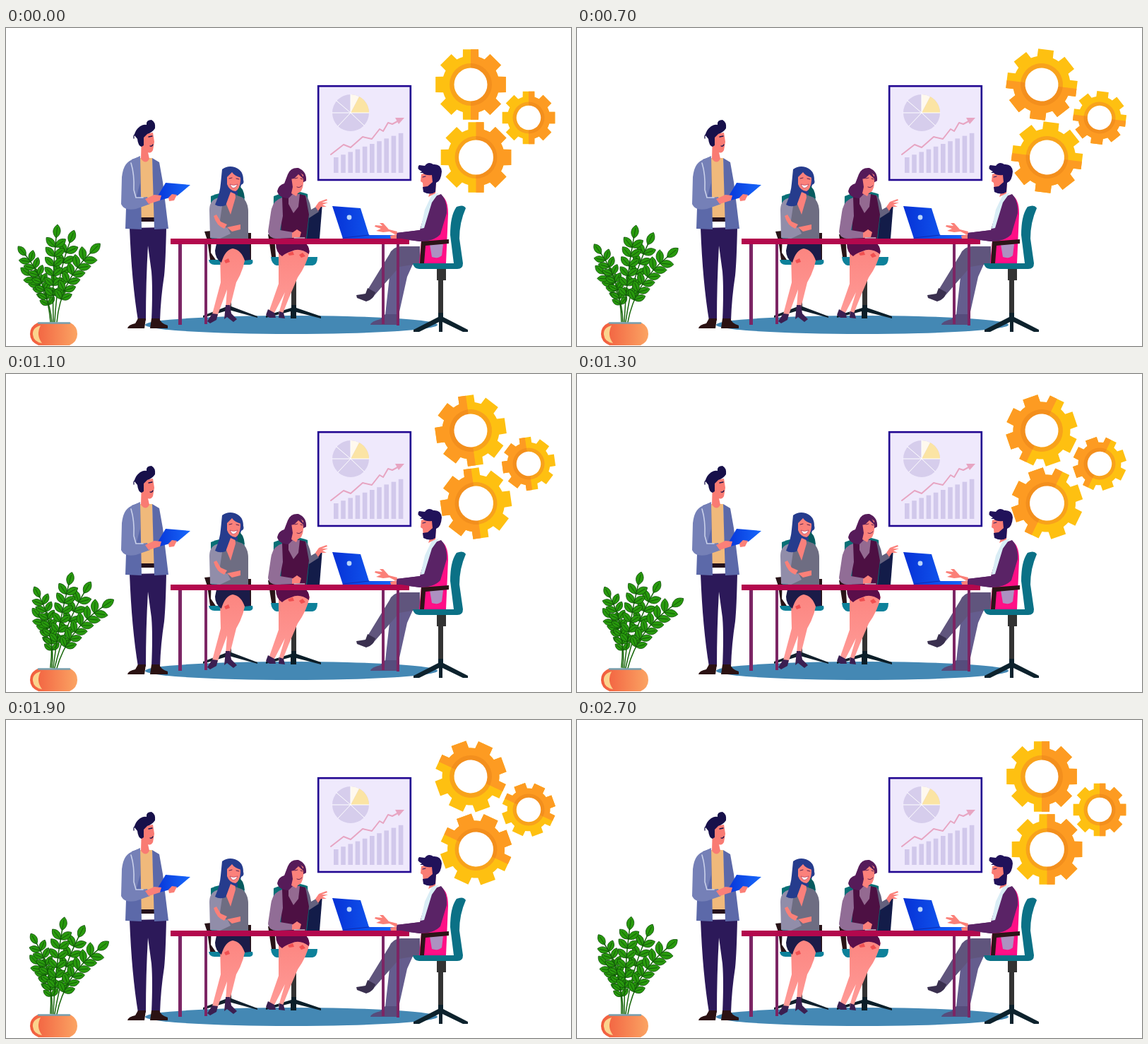
An HTML page for the animation above (2.8 s loop, 800 by 450 pixels).

```html
<!DOCTYPE html>
<html lang="en">
<head>
<meta charset="utf-8">
<title>Team meeting</title>
<style>
  html, body { margin: 0; width: 100%; height: 100%; overflow: hidden; background: #fff; }
  svg { display: block; width: 800px; height: 450px; }
  .line { fill: none; stroke-linecap: round; stroke-linejoin: round; }
</style>
</head>
<body>
<svg viewBox="0 0 800 450">
  <defs>
    <clipPath id="rightHalf"><path d="M0-60H60V60H0Z"/></clipPath>
    <linearGradient id="blue"><stop stop-color="#0632d6"/><stop offset="1" stop-color="#1768fb"/></linearGradient>
    <linearGradient id="potFill"><stop stop-color="#f15a3d"/><stop offset="1" stop-color="#fba463"/></linearGradient>
    <linearGradient id="shin" x2="0" y2="1"><stop stop-color="#fc8580"/><stop offset="1" stop-color="#ff9c98"/></linearGradient>
  </defs>

  <ellipse cx="404" cy="420" rx="207" ry="13" fill="#4488b4"/>

  <g id="board">
    <rect x="442.2" y="82.2" width="130.6" height="132.8" fill="#efe9fc" stroke="#210591" stroke-width="2.6"/>
    <circle cx="488" cy="120" r="26" fill="#d6cdec"/>
    <path d="M488 120L500 97A26 26 0 0 1 514 120Z" fill="#fbe4a4"/>
    <path d="M488 120V94A26 26 0 0 1 500 97Z" fill="#fff9ee"/>
    <path class="line" stroke="#fff" d="M462 120H514M488 120L468 103M488 120L470 139M488 120V94M488 120L507 138"/>
    <g id="bars" fill="#d1c8eb"></g>
    <path class="line" stroke="#e7a5c2" stroke-width="2" d="M460 179L478 165L488 169L505 154L518 157L529 143L534 146L541 134L547 136L558 130"/>
    <path fill="#e7a5c2" d="M551 127L564 127L556 136Z"/>
  </g>

  <g id="gears"></g>

  <g id="plant"></g>
  <g id="pot">
    <path fill="url(#potFill)" d="M45 417H91Q101 422 101 433Q101 444 90 449H46Q34 444 34 433Q34 422 45 417Z"/>
    <path fill="#fbd38d" d="M49 421Q37 424 38 434Q39 444 51 446Q42 434 49 421Z"/>
    <path class="line" stroke="#779fae" stroke-width="2.4" d="M46 417.5H90"/>
  </g>

  <g id="standingMan">
    <path fill="#2c1959" d="M175 283L227 282Q226 330 224 350Q219 382 218 414H206Q208 370 206 345L201 308Q198 360 198 414H187Q178 360 175 283Z"/>
    <path fill="#2b1213" d="M187 411H198L196 425H172Q173 420 183 418ZM206 411H217Q219 418 229 421V425H204Z"/>
    <path fill="#f0b97b" d="M190 184H207L211 271H190Z"/>
    <path fill="#24121c" d="M190 268H210V274H190Z"/>
    <path fill="#f97b73" d="M192 151L208 148L210 161L208 173Q205 178 201 176L203 185Q198 194 191 185Z"/>
    <path fill="#17104a" d="M192 168Q187 167 186 157L182 152Q182 145 190 139Q195 136 199 137Q198 130 206 130Q212 133 211 142Q207 148 200 150L195 155L195 166Z"/>
    <path class="line" stroke="#17104a" stroke-width="1.3" d="M185 150Q180 150 181 156M202 154L207 153M204 167Q207 168 208 165"/>
    <path fill="#5c69a9" d="M207 184L217 190L222 218L230 284L210 285ZM178 186L190 182L192 285L169 284L171 225Z"/>
    <path fill="#7580b7" d="M190 181L177 187Q166 192 164 211L163 249Q167 259 184 256L204 249L200 239L184 241L190 219Z"/>
    <path class="line" stroke="#c9d0ea" stroke-width="1.6" d="M177 191Q182 207 181 229L184 240L194 240"/>
    <path fill="url(#blue)" d="M226 219L261 222L243 237L210 246Z"/>
    <path fill="#fb8078" d="M197 242L210 236L220 237L218 244L202 249ZM230 240L235 235L242 236L238 244L231 245Z"/>
  </g>

  <g id="firstWoman">
    <path fill="#087076" d="M290 238Q315 228 336 235L340 252V298H290Z"/>
    <path fill="#291418" d="M281 288L291 287L290 318L297 328H289L285 300ZM341 290H347V328H342Z"/>
    <path fill="#11202c" d="M313 335H319V394L356 408V410L316 399L279 410V407L313 394Z"/>
    <path fill="#0d819a" d="M287 328H349Q351 334 345 335H295Q288 335 287 328Z"/>
    <path fill="url(#shin)" d="M303 318Q320 305 340 316Q338 340 326 360L317 396L311 396L313 370L299 408L292 405L304 360Z"/>
    <path fill="#1b1b48" d="M298 305H345L346 328L338 329Q333 314 321 312Q310 314 305 332Q296 326 296 315Z"/>
    <path fill="#f04f50" d="M309 329L315 326L317 331L311 333Z"/>
    <path fill="#3b1f51" d="M292 404L300 405L298 413L289 418L285 415ZM311 392L317 392L319 404L327 412L322 416L313 409L309 412Z"/>
    <path fill="#6e6d82" d="M301 239L317 234L334 239Q343 246 343 260V298H299Z"/>
    <path fill="#918da9" d="M302 240Q288 242 288 258L289 297L303 298L318 291L314 283L302 279L306 252Z"/>
    <path fill="#fa807b" d="M313 229H324L325 240L318 264L309 242Z"/>
    <path fill="#263c8d" d="M306 200Q314 194 324 197Q336 201 336 215Q338 220 333 222L329 237L318 232L311 251Q302 254 296 250Q303 234 304 220Z"/>
    <path fill="#075b5f" d="M327 221Q337 226 338 241L328 237Z"/>
    <path fill="#fb817b" d="M313 209Q317 202 323 202Q333 207 332 216Q331 228 325 231Q316 230 313 221Z"/>
    <path fill="#263c8d" d="M313 211Q312 200 321 198Q328 201 334 212Q324 210 320 204Z"/>
    <path class="line" stroke="#54224e" d="M316 213L320 212M326 213L330 214"/>
    <path fill="#fff" stroke="#a4244a" stroke-width=".6" d="M317 221Q322 224 328 221Q325 228 320 226Z"/>
    <path fill="#fb8078" d="M294 266L298 264L304 274L313 278L309 284Q298 280 294 266ZM313 282L332 278L332 285L320 288Z"/>
  </g>

  <g id="secondWoman">
    <path fill="#087076" d="M379 238Q406 226 427 235L431 298H378Z"/>
    <path fill="#291418" d="M371 292H380L382 324H376Z"/>
    <path fill="#333" d="M404 336H411V394H404Z"/>
    <path fill="#0b1e28" d="M404 392H411V396L446 408V411L411 402V411H403V401L368 410V407L404 396Z"/>
    <path fill="#0d819a" d="M375 324H441Q441 335 434 336H383Q376 334 375 324Z"/>
    <path fill="url(#shin)" d="M386 316Q410 306 430 315Q426 335 413 353L401 381L391 406L386 404L395 374L379 405L372 402L386 362Z"/>
    <path fill="#5a0e4a" d="M382 305H425Q431 312 429 320Q416 310 404 316Q395 319 391 323Q382 318 382 305Z"/>
    <path fill="#f04f50" d="M399 319L406 316L408 321L401 322ZM415 321L420 318L424 323L418 325Z"/>
    <path fill="#3b1f51" d="M371 398L380 403L382 410L373 410L368 406ZM387 401L393 403L395 411L386 410Z"/>
    <path fill="#131c49" d="M430 259L448 248L444 298H426Z"/>
    <path fill="#64617e" d="M423 236Q430 241 432 257L439 253L443 260L429 269Z"/>
    <path fill="#fb817b" d="M438 253L443 246L454 242L455 244L447 247L456 247L448 250L454 253L446 253L442 259Z"/>
    <path fill="#4d1043" d="M391 239L407 233L424 237L429 264L425 298H389Z"/>
    <path fill="#916d96" d="M391 240Q377 244 375 261L371 288Q372 298 384 298L407 297L406 289L388 286L392 266Z"/>
    <path fill="#946a91" d="M400 235H416L414 253L407 262L400 249Z"/>
    <path fill="#fb817b" d="M405 290L412 285L418 289L416 296L405 297Z"/>
    <path class="line" stroke="#fff" d="M408 297H423"/>
    <path fill="#561b59" d="M399 207Q403 197 414 198Q426 203 425 216L420 219Q418 232 408 233L400 241Q386 240 384 231Q386 222 394 220Z"/>
    <path fill="#fb817b" d="M404 211L414 203L421 208L421 220Q420 232 413 234L411 238L404 234L406 225Z"/>
    <path fill="#561b59" d="M402 214L406 204L414 200L425 217L414 207L408 213Z"/>
    <path class="line" stroke="#5d2150" d="M409 213L413 212M417 213L420 214M412 225Q416 227 419 223"/>
  </g>

  <g id="seatedMan">
    <path fill="#333" d="M610 340H623V357H619V405H612V357H610Z"/>
    <path fill="#0d222d" d="M612 403H619V409L654 427V430H647L618 416V430H613V416L585 430H577V427L612 409Z"/>
    <path fill="#655d8e" d="M556 318L582 321L568 352L556 406H537L543 352Z"/>
    <path fill="#564c7c" d="M537 405L557 405L555 420H516Q517 415 530 412Z"/>
    <path fill="#60557d" d="M586 309L559 309Q547 310 543 320L513 369L522 378L557 338L586 333Z"/>
    <path fill="#3a304f" d="M512 368L523 374Q521 384 510 387L497 382L496 378L509 376Z"/>
    <path fill="#0b7186" d="M638 253Q648 249 651 255Q642 275 642 298L647 333Q647 341 639 341H585Q577 340 576 333H634L629 293Q629 265 638 253Z"/>
    <path fill="#ff0f86" d="M618 238Q626 244 626 263L623 333H585L588 300L607 280Z"/>
    <path fill="#5a2366" d="M605 239L616 235Q625 244 624 262L615 292Q606 302 586 302L553 298V290L586 286L592 266Z"/>
    <path fill="#d9edf5" d="M603 236L613 233L603 247L592 283L587 284L593 257Z"/>
    <path fill="#ad91c1" d="M600 306H619L617 322Q612 327 603 324Z"/>
    <path fill="#2c1518" d="M588 302L627 299V305L594 308L592 333H586Z"/>
    <path fill="#fb7d74" d="M588 207L606 202L609 216L608 234L598 239L601 230L591 230L590 219L587 217Z"/>
    <path fill="#21125a" d="M586 205L589 203Q580 199 585 194L593 195Q598 188 605 193Q616 192 617 203Q616 217 609 219L608 232Q601 237 591 232L590 225L597 224L604 218L603 208Q594 209 590 205Z"/>
    <path class="line" stroke="#21125a" d="M590 211L594 210"/>
  </g>

  <g id="table">
    <path fill="#7c2564" d="M244 305H249V420H244ZM281 305H285V419H281ZM532 305H536V419H532ZM553 305H557V421H553Z"/>
    <path fill="#b3084d" d="M233 298H571V306H233Z"/>
    <path fill="#5a2366" d="M553 290L586 286V302L553 297Z"/>
    <path fill="url(#blue)" d="M462 252L502 255L514 293L552 293L550 298H477Z"/>
    <path class="line" stroke="#0b2bb2" d="M477 297L514 293"/>
    <circle cx="486" cy="268" r="3.4" fill="#b9d5fa"/>
    <path fill="#fb8078" d="M554 288L542 285L534 276L529 276L533 280L523 279L522 281L531 284L524 287L534 289L543 288L553 293ZM544 294L553 292V298H545Z"/>
  </g>
</svg>
<script>
const LOOP = 2800, STEP = 100;
const byId = id => document.getElementById(id);
const polar = (r, deg) => {
  const a = deg * Math.PI / 180;
  return `${(r * Math.cos(a)).toFixed(2)} ${(r * Math.sin(a)).toFixed(2)}`;
};

// Key poses are 400 ms apart; the first lies 100 ms before the loop starts.
function pose(keys, ms) {
  const k = (ms + 100) / 400, i = Math.min(Math.floor(k), keys.length - 2);
  return keys[i] + (keys[i + 1] - keys[i]) * (k - i);
}

const gearTurn = [-12, 36, 97, 172, 240, 295, 340, 360];
const sway = {
  left: [-.5, 1.6, 3.8, 11.8, 10.8, 9.4, 7.9, 6.9],
  middle: [-.7, 2, 4.5, 8.6, 6.6, 4.1, 2.5, 1.6],
  right: [-.8, 2.3, 5.3, 10.7, 8.6, 6.6, 4.9, 4.7]
};

function gearOutline() {
  let d = '';
  for (let a = 0; a < 360; a += 45) {
    d += `${a ? 'L' : 'M'}${polar(40.5, a - 16)}L${polar(51, a - 12.5)}`
       + `L${polar(51, a + 12.5)}L${polar(40.5, a + 16)}A40.5 40.5 0 0 1 ${polar(40.5, a + 29)}`;
  }
  return d + 'Z';
}

const outline = gearOutline();
const gears = [[658, 80, 1, 23.5], [665.5, 183, 1, 24.5], [740, 127, .75, 23]];
byId('gears').innerHTML = gears.map(([x, y, size, hole]) =>
  `<g transform="translate(${x} ${y}) scale(${size})"><g class="gear">
    <path d="${outline}" fill="#fec011"/><circle r="30" fill="#f8a21b"/>
    <g clip-path="url(#rightHalf)"><path d="${outline}" fill="#fd9b22"/><circle r="30" fill="#f38f1d"/></g>
    <circle r="${hole}" fill="#fff"/></g></g>`).join('');

byId('bars').innerHTML = [...Array(10).keys()].map(i =>
  `<path d="M${464 + i * 10.2} 205v${-22 - i * 3.8}h6.6v${22 + i * 3.8}z"/>`).join('');

function leaf(x, y, deg, length) {
  const w = length * .36;
  return `<path transform="translate(${x} ${y}) rotate(${deg})" fill="#289a0d" stroke="#10530a" stroke-width=".8"
    d="M0 0C${length * .3} ${-w} ${length * .7} ${-w} ${length} 0C${length * .7} ${w} ${length * .3} ${w} 0 0M0 0H${length * .8}"/>`;
}

// A stem is a quadratic curve with pairs of leaves and one at the tip.
function branch(side, base, bend, tip, pairs, size) {
  const [bx, by] = base, [cx, cy] = bend, [tx, ty] = tip;
  const curve = (a, b, c, u) => a * (1 - u) ** 2 + 2 * b * u * (1 - u) + c * u * u;
  const slope = (a, b, c, u) => (b - a) * (1 - u) + (c - b) * u;
  let out = `<path class="line" stroke="#17660a" stroke-width="1.5" d="M${bx} ${by}Q${cx} ${cy} ${tx} ${ty}"/>`;
  for (let i = 0; i <= pairs; i++) {
    const u = .3 + .7 * i / pairs;
    const x = curve(bx, cx, tx, u), y = curve(by, cy, ty, u);
    const deg = Math.atan2(slope(by, cy, ty, u), slope(bx, cx, tx, u)) * 180 / Math.PI;
    const length = size * (.75 + .25 * u);
    out += i === pairs ? leaf(x, y, deg, length)
      : leaf(x, y, deg - 48, length) + leaf(x, y, deg + 48, length);
  }
  return `<g class="branch" data-side="${side}">${out}</g>`;
}

byId('plant').innerHTML =
  branch('left', [65, 416], [61, 372], [34, 350], 5, 17) +
  branch('right', [69, 416], [72, 352], [90, 304], 5, 19) +
  branch('left', [63, 416], [58, 358], [28, 322], 6, 17) +
  branch('middle', [67, 416], [65, 352], [71, 297], 6, 19) +
  branch('right', [72, 416], [77, 360], [119, 319], 6, 20);

const wheels = document.querySelectorAll('.gear');
const branches = document.querySelectorAll('.branch');

function draw() {
  const ms = Math.floor(performance.now() % LOOP / STEP) * STEP;
  wheels.forEach(g => g.setAttribute('transform', `rotate(${pose(gearTurn, ms)})`));
  branches.forEach(b => b.setAttribute('transform', `rotate(${pose(sway[b.dataset.side], ms)} 67 415)`));
  requestAnimationFrame(draw);
}
draw();
</script>
</body>
</html>
```
